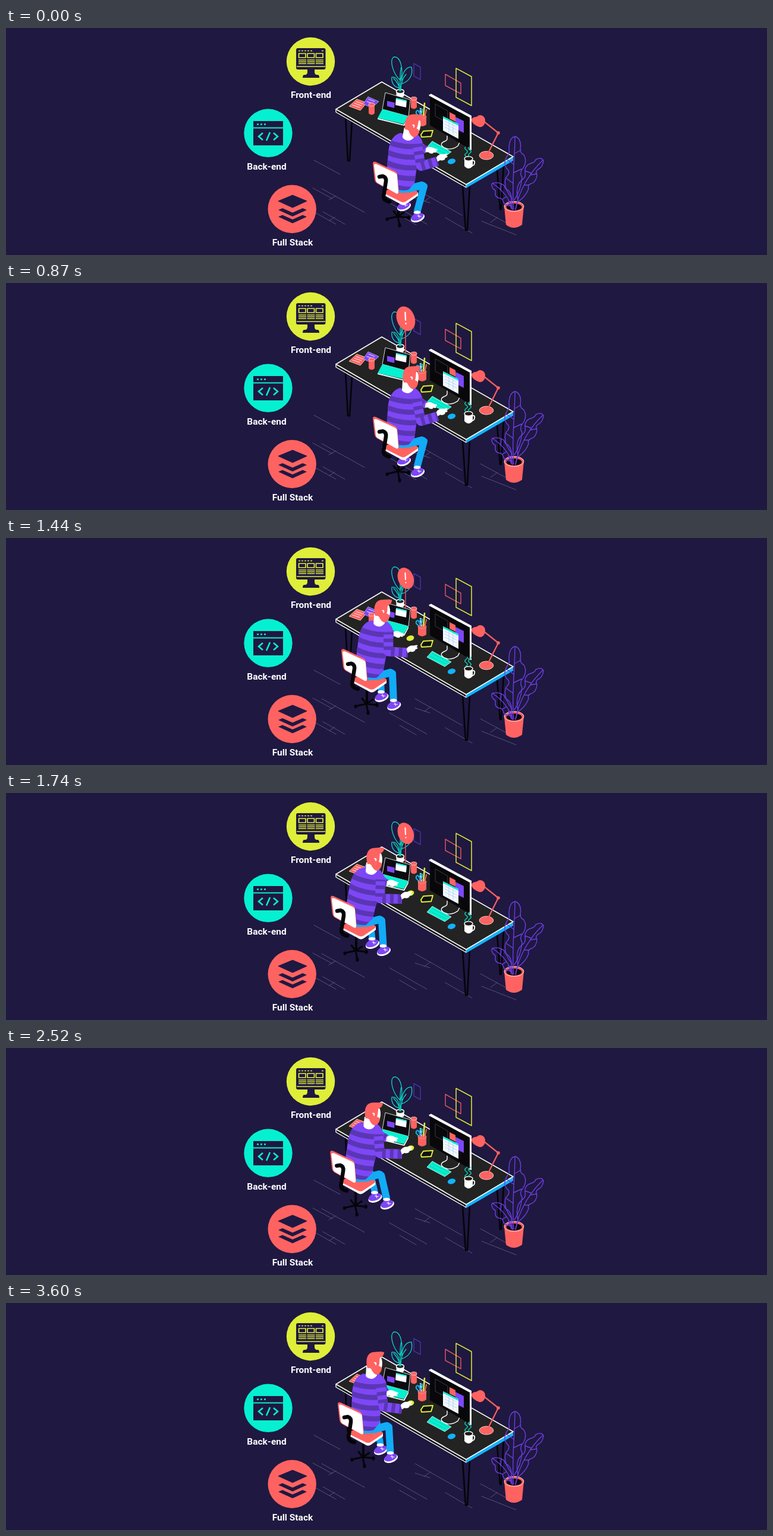
An HTML page that plays this animation: 1280x383 px, repeating every 3.63 s.

```html
<!DOCTYPE html>
<html lang="en">
<head>
<meta charset="utf-8">
<title>Developer at work</title>
<style>
  html, body { margin: 0; width: 100%; height: 100%; overflow: hidden; background: #1f1841; }
  svg { display: block; width: 100vw; height: 100vh; }
  .label { font: 700 15.5px Roboto, Arial, sans-serif; fill: #fff; text-anchor: middle; }
  .ink { fill: #1f1841; }
  .red { fill: #ff6361; }
  .teal { fill: #05f0d0; }
  .violet { fill: #7d47f5; }
  .blue { fill: #12b2fc; }
  .yellow { fill: #dfee39; }
  .white { fill: #fff; }
  .line { fill: none; stroke-linecap: round; stroke-linejoin: round; }
  .limb { fill: none; stroke: #12abf6; stroke-linejoin: round; }
  .sleeve { fill: none; stroke: #7d47f5; stroke-linejoin: round; }
  .band { fill: none; stroke: #5a36b4; }
  .iron { fill: none; stroke: #050409; stroke-linecap: round; stroke-linejoin: round; }
</style>
</head>
<body>
<svg viewBox="0 0 1280 383" preserveAspectRatio="none">
  <defs>
    <path id="trunk" d="M664 177C651 180 644 193 643 212C641 230 640 246 641 263Q656 277 677 273L687 262C690 246 690 232 697 217C706 201 702 185 688 177Q676 184 664 177Z"/>
    <clipPath id="trunkClip"><use href="#trunk"/></clipPath>
    <g id="shoe">
      <ellipse class="white" rx="12" ry="6.800" transform="rotate(-20) translate(0 1.500)"/>
      <ellipse class="violet" rx="11" ry="6" transform="rotate(-20) translate(0 -.5)"/>
      <path class="violet" d="M-6-8H5L6 0-6 2Z"/>
      <ellipse class="white" cx="-.5" cy="-8" rx="6" ry="2.800"/>
      <path class="line" stroke="#fff" d="M0-2 6-1M2-4 3 1"/>
    </g>
    <path id="hand" class="white" d="M-9-2C-5-6 0-6 4-4L10-3Q12-1 8 0L10 2Q8 4 5 3L4 5Q0 7-4 4L-9 5Z"/>
    <g id="can">
      <path class="red" d="M-5-8V7Q0 12 5 7V-8Z"/>
      <ellipse class="red" cy="-8" rx="5" ry="2.800" stroke="#ffd5cf" stroke-width=".8"/>
    </g>
  </defs>

  <!-- topic badges -->
  <circle class="yellow" cx="512.500" cy="56.500" r="40.700"/>
  <g class="ink">
    <rect x="488" y="34" width="49.500" height="36" rx="3"/>
    <path d="M507 70H519V74Q519 78 522 79H525Q527 80 527 84H499Q499 80 501 79H504Q507 78 507 74Z"/>
  </g>
  <g class="line" stroke="#dfee39" stroke-width="1.700" style="stroke-linecap:butt">
    <path stroke-dasharray="3 2" d="M492 38.500H516M531 38.500H534"/>
    <path d="M492.500 43H504V50H492.500ZM507 43H518.500V50H507ZM521.500 43H533V50H521.500Z"/>
    <path stroke-width="1.400" d="M492 54H505M492 57H505M492 60H505M506.500 54H519.500M506.500 57H519.500M506.500 60H519.500M521 54H534M521 57H534M521 60H534M489 65H537"/>
  </g>
  <text class="label" x="513" y="118">Front-end</text>

  <circle class="teal" cx="441" cy="177.300" r="40.700"/>
  <rect class="ink" x="416" y="157" width="50" height="41"/>
  <g class="line" stroke="#05f0d0" stroke-width="2.600" style="stroke-linecap:butt;stroke-linejoin:miter">
    <path stroke-width="2" d="M416 168.500H466"/>
    <path stroke-dasharray="3 3" d="M422 162.500H437"/>
    <path d="M432 177 425 183 432 189M450 177 457 183 450 189M444 176 438 190"/>
  </g>
  <text class="label" x="438.500" y="239">Back-end</text>

  <circle class="red" cx="481.200" cy="305.500" r="40.700"/>
  <g class="ink">
    <path d="M482 282 506 292 482 303 458 292Z" stroke="#1f1841" stroke-linejoin="round"/>
    <path id="tier" d="M458 307 465 304 482 311.500 499 304 506 307 482 318Z"/>
    <use href="#tier" y="11.500"/>
  </g>
  <text class="label" x="482" y="367">Full Stack</text>

  <!-- floor and wall -->
  <path class="line" stroke="#58527a" stroke-width="1" d="M518 223 562 247M516 270 549 288M531 271 603 311M555 283 543 290M521 312 555 331M533 310 570 331M553 319 544 325M645 295 708 331M662 316 690 332M688 271 767 316M688 287 713 295M714 285 703 293M739 320 784 346M798 305 842 329M800 326 858 349M826 320 815 328"/>
  <g class="line" stroke-width="1.500">
    <path stroke="#4b2fa0" d="M686 60 697 66V87L686 81Z"/>
    <path stroke="#d9545f" d="M739 78 765 93V111L739 97Z"/>
    <path stroke="#dfee39" d="M757 68 783 82V131L757 117Z"/>
  </g>

  <!-- desk -->
  <path class="iron" stroke-width="2.600" d="M571 150 575 224H578L582 156M768 265 773 341H776L780 265M826 238 831 306H833L837 230"/>
  <path fill="#111" stroke="#fff" stroke-width="1.400" stroke-linejoin="round" d="M555 137 774 264V269L555 142Z"/>
  <path class="blue" d="M774 264 853 217V224L774 270Z"/>
  <path fill="#232323" stroke="#fff" stroke-width="1.600" stroke-linejoin="round" d="M555 137 632 91 853 217 774 264Z"/>

  <!-- desk plant -->
  <path class="white" d="M656.500 107V115Q663 121 669.500 115V107Z"/>
  <ellipse cx="663" cy="107" rx="6.500" ry="3.500" fill="#222" stroke="#fff" stroke-width="1.500"/>
  <path class="line" stroke="#08d9c1" stroke-width="1.300" d="M663 106C663 84 662 74 665 66M663 88C650 76 645 54 652 49C663 46 670 70 663 90M664 106C664 90 668 84 673 78M666 94C664 76 674 65 682 66C685 80 678 90 666 94M662 106C662 96 657 90 652 85M661 101C651 99 648 90 649 83C657 82 662 91 661 101"/>
  <g id="alert">
    <path stroke="#d94f56" stroke-width="1.600" d="M672 84V118"/>
    <ellipse class="red" cx="672.300" cy="68" rx="13" ry="18.500" transform="rotate(-20 672.300 68)"/>
    <path class="line" stroke="#fff" stroke-width="2" d="M671.500 59 672 70M672.500 75V75.500"/>
  </g>

  <!-- papers, cans, laptop -->
  <path class="red" stroke="#ffd5cf" stroke-width=".8" d="M577 132 590 120 607 126 596 139Z"/>
  <path class="violet" stroke="#c6b2ff" stroke-width=".8" d="M601 128 609 116 627 124 615 135Z"/>
  <path class="line" stroke="#fff" stroke-width=".9" d="M589 124 600 128M586 127 598 131M583 130 595 134M610 120 620 124M607 124 618 128"/>
  <use href="#can" x="615" y="137"/>
  <path fill="#0c0b10" stroke="#d8d8e0" stroke-width="1" stroke-linejoin="round" d="M638 109 680 121 677 149 633 137Z"/>
  <path class="violet" d="M641 123 654 126 653 135 641 132Z"/>
  <path class="white" d="M656 118 674 122 673 134 655 130Z"/>
  <path class="teal" d="M656 118 674 122V124L656 120Z"/>
  <path class="white" d="M625 152 669 163 677 149V152L670 165 625 154Z"/>
  <path class="teal" d="M625 152 633 137 677 149 669 162Z"/>
  <use href="#can" x="686" y="127"/>

  <!-- pen pot, phone, mice -->
  <g class="line" stroke-width="2">
    <path stroke="#dfee39" stroke-width="2.600" d="M704 127 702 150"/>
    <path stroke="#ff6361" d="M707 138 704 150"/>
    <path stroke="#fff" d="M697 136 699 150"/>
    <path stroke="#12b2fc" d="M696 151 692 146C688 144 690 137 694 140L698 150M696 141C697 134 702 136 700 141L697 148"/>
  </g>
  <path class="red" d="M693 149V163Q700 169 707 163V149Z"/>
  <ellipse cx="700" cy="149.500" rx="7" ry="3" fill="none" stroke="#ff8b84"/>
  <path fill="#111" stroke="#dfee39" stroke-width="2" stroke-linejoin="round" d="M698 180 702 174 718 173 715 183 699 184Z"/>
  <ellipse class="yellow" cx="680" cy="169" rx="6.500" ry="4.500" transform="rotate(-15 680 169)"/>
  <ellipse class="blue" cx="749.500" cy="225" rx="6.800" ry="4.500" transform="rotate(-15 749.500 225)"/>

  <!-- monitor -->
  <path class="line" stroke="#fff" stroke-width="1.400" d="M742 182V187Q742 190 736 192C728 196 734 202 743 204Q752 205 760 199L763 193"/>
  <path class="white" d="M711 113 715 111 783 148V206L779 205Z"/>
  <path fill="#08080b" d="M713 115 780 151V204L713 164Z"/>
  <path fill="none" stroke="#3b3946" d="M722 128 743 140V160L722 149Z"/>
  <path class="red" d="M746 142 756 147V158L746 153Z"/>
  <path class="violet" d="M756 150 770 157V177L756 170Z"/>
  <path fill="#f0f8ff" d="M735 149 761 162V187L735 173Z"/>
  <path class="teal" d="M735 149 761 162V165L735 152Z"/>
  <path fill="none" stroke="#a8c3ec" stroke-width=".7" d="M738 157 758 167M738 162 758 172M738 167 758 177M745 157V176M752 160V180"/>

  <!-- keyboard, lamp, mug -->
  <path class="teal" stroke="#fff" stroke-width=".7" d="M708 201 717 191 749 209 738 217Z"/>
  <path fill="none" stroke="#05b9a3" stroke-dasharray="2 1" d="M713 199 741 213M717 195 745 210"/>
  <ellipse class="red" cx="808" cy="215" rx="11.800" ry="7" stroke="#ffd0c9"/>
  <path class="line" stroke="#f35f5f" stroke-width="2.300" d="M803 157 828 177 810 213"/>
  <circle class="red" cx="828" cy="177" r="2.800"/>
  <path class="red" d="M783 154C785 149 792 151 794 148C799 145 806 149 806 156C806 164 801 168 796 167C790 165 782 160 783 154Z"/>
  <path class="line" stroke="#fff" stroke-width="1.800" d="M785 224C790 222 789 232 784 232"/>
  <path class="white" d="M771 220V233Q778 241 785 233V220Z"/>
  <ellipse cx="778" cy="220.500" rx="7" ry="3.800" fill="#24160f" stroke="#fff" stroke-width="1.500"/>
  <path id="steam" class="line" stroke="#08cdb8" stroke-width="1.500"/>

  <!-- floor plant -->
  <path class="red" d="M838 301 841 332Q854 342 868 332L871 301Z"/>
  <ellipse cx="854.500" cy="301" rx="16.500" ry="8.500" fill="#ff6361" stroke="#ffd0c9"/>
  <ellipse cx="854.500" cy="302" rx="13" ry="6" fill="#0b0812"/>
  <g class="line" stroke="#6c3ee0" stroke-width="1.400">
    <path d="M854 306C850 270 856 220 856 184M851 288Q835 268 841 252Q848 246 845 240Q834 230 843 216Q848 211 846 205Q846 184 857 183Q868 188 865 205Q865 211 871 214Q878 226 867 240Q864 246 868 252Q866 274 855 290M855 212 866 206M854 230 843 222M854 244 867 238M853 262 842 254"/>
    <path d="M857 306C862 276 880 245 903 223M861 290Q856 266 868 256Q875 252 873 243Q872 231 884 228Q890 226 891 222Q901 217 904 224Q903 235 894 239Q890 242 893 249Q891 261 882 263Q877 265 879 271Q875 283 862 293M884 245 873 241M882 248 893 246M872 265 880 265"/>
    <path d="M852 306C847 288 835 273 818 262M849 300Q838 300 836 292Q835 287 829 287Q822 285 823 278Q824 273 820 272Q815 265 818 262Q830 259 838 266Q839 272 844 273Q852 280 850 296M832 274 833 263M841 285 835 289"/>
    <path d="M850 305 845 292M852 306 850 290M857 306 861 291"/>
  </g>

  <!-- person and chair -->
  <g id="base">
    <path class="iron" stroke-width="4" d="M660 294V317"/>
    <path class="iron" stroke-width="3" d="M659 318 641 322M659 318 662 333M659 318 677 320M659 318 652 309M659 318 670 311"/>
    <path class="iron" stroke-width="5" d="M641 322V323M662 332V334M677 319V321"/>
  </g>
  <path id="farLeg" class="limb" stroke-width="11"/>
  <use id="farShoe" href="#shoe"/>
  <g id="seat">
    <path class="white" d="M636 282 665 298Q669 300 673 297L693 283V277L636 276Z"/>
    <path class="red" d="M632 277 660 266 691 275Q695 278 690 281L672 293Q668 295 664 293Z"/>
  </g>
  <path id="thigh" class="limb" stroke-width="13"/>
  <path id="shin" class="limb" stroke-width="12"/>
  <use id="nearShoe" href="#shoe"/>
  <path id="farArm" class="sleeve" stroke-width="12"/>
  <path id="farBand" class="band" stroke-width="12" stroke-dasharray="5 7"/>
  <use id="farHand" href="#hand"/>
  <g id="torso">
    <use href="#trunk" class="violet"/>
    <path clip-path="url(#trunkClip)" class="band" stroke-width="8.500" d="M636 189Q668 206 710 197M636 207Q668 224 710 215M636 225Q668 242 710 233M636 243Q668 260 710 251M636 261Q668 278 710 269"/>
  </g>
  <path id="arm" class="sleeve" stroke-width="16"/>
  <path id="armBand" class="band" stroke-width="16" stroke-dasharray="6 7" stroke-dashoffset="3"/>
  <use id="nearHand" href="#hand"/>
  <g id="head">
    <path class="white" d="M-8-14H8L10 1Q6 7 0 7Q-7 6-9 2ZM5-30 17-29C20-22 19-14 17-9L5-6Z"/>
    <path class="red" d="M-6-11C-8-18-9-28-4-34C1-40 10-38 17-39L22-38C22-33 19-30 15-29C14-25 15-20 13-15C16-14 18-13 18-9C16-3 13 0 9 0C4-2 2-6 0-10Q-3-12-6-11Z"/>
    <path class="line" stroke="#fff" stroke-width="2" d="M6-20Q9-21 8-17"/>
  </g>
  <g id="back">
    <path class="red" d="M617 229Q617 224 622 226L654 241Q658 243 658 247L661 277Q661 282 656 280L624 262Q621 260 620 256Z"/>
    <path class="white" d="M619 232Q619 228 624 230L654 244Q658 246 658 250L660 276Q660 281 656 279L626 262Q622 260 622 256Z"/>
    <path class="iron" stroke-width="6.500" d="M628 251 634 250Q640 252 639 259L635 284Q635 291 645 293"/>
  </g>
</svg>

<script>
const LOOP = 3630;
const el = id => document.getElementById(id);
const set = (id, name, value) => el(id).setAttribute(name, value);

// Rows are [time, ...values]; eased between neighbours.
function track(t, rows) {
  if (t <= rows[0][0]) return rows[0].slice(1);
  const i = rows.findIndex(r => r[0] > t);
  if (i < 0) return rows[rows.length - 1].slice(1);
  const a = rows[i - 1], b = rows[i];
  let u = (t - a[0]) / (b[0] - a[0]);
  u = u * u * (3 - 2 * u);
  return a.slice(1).map((v, k) => v + (b[k + 1] - v) * u);
}

const chair = [[1000, 0, 0], [1200, -7, -4.5], [1580, -73, -53], [1740, -71, -52],
  [2160, -73, -52.5], [2780, -71, -52], [3220, -59, -58]];
const lean = [[0, 0], [510, -1], [960, -1], [1200, -7], [1580, 9], [2160, 9], [2820, 4], [3220, -3]];
const nod = [[0, 4, 7], [330, -2, -2], [510, 0, 0], [1000, 0, 0], [1200, -3, 0], [1580, 4, 0],
  [2160, 4, 0], [2820, 3, 4], [3260, 0, -1], [3440, 1, 1], [3600, 0, 0]];
const nearFoot = [[1200, 692, 319], [1580, 635, 266], [2300, 635, 266], [2750, 647, 261]];
const farFoot = [[1000, 669, 300], [1200, 667, 299], [1580, 616, 254], [2350, 616, 254], [2800, 630, 247.5]];
const nearHand = [[900, 733, 218], [1200, 711, 229], [1560, 673, 172]];
const farHand = [[850, 715, 206], [1200, 687, 190], [1560, 649, 153]];
const elbow = [[950, 698, 233], [1200, 685, 231], [1560, 629, 178], [2800, 629, 178], [3220, 635, 175]];
const pop = [[640, 0], [820, 1.25], [960, .94], [1060, 1]];
const fade = [[2040, 1], [2220, 0]];

function steam(t) {
  let d = "";
  for (const x of [774, 780]) {
    for (let y = 201; y <= 217; y++) {
      const sway = 2.2 * Math.sin(y * .55 + t / LOOP * Math.PI * 8);
      d += (y > 201 ? "L" : "M") + (x + sway).toFixed(2) + " " + y;
    }
  }
  return d;
}

function draw(t) {
  const [cx, cy] = track(t, chair);
  const [l] = track(t, lean);
  const [dy, tilt] = track(t, nod);
  const at = (x, y) => [x + cx, y + cy];
  const move = (id, x, y, rest = "") => set(id, "transform", `translate(${x} ${y}) ${rest}`);
  const path = (id, ...pts) => set(id, "d", "M" + pts.map(p => p.join(" ")).join("L"));

  for (const id of ["base", "seat", "back"]) move(id, cx, cy);
  move("torso", cx, cy, `rotate(${l * .65} 662 268)`);
  move("head", 676 + cx + l, 179 + cy + dy, `rotate(${tilt})`);

  const [nx, ny] = track(t, nearFoot), [fx, fy] = track(t, farFoot);
  const knee = at(703, 267);
  path("thigh", at(654, 272), at(678, 271), at(699, 265.5), knee);
  path("shin", at(697, 264), knee, [nx - .5, ny - 9]);
  path("farLeg", at(672, 266), at(682, 253), [fx, fy - 8]);
  move("nearShoe", nx, ny);
  move("farShoe", fx, fy);

  const tap = t < 900 || t > 1650 ? Math.sin(t / 38) : 0;
  const [hx, hy] = track(t, nearHand), [gx, gy] = track(t, farHand);
  const joint = track(t, elbow);
  const press = t < 900 ? tap : 0;
  for (const id of ["arm", "armBand"])
    path(id, at(692 + l, 198), joint, [hx - 7, hy + 7]);
  for (const id of ["farArm", "farBand"])
    path(id, at(690 + l, 194), [gx - 7, gy + 1]);
  move("nearHand", hx, hy + press, "rotate(-18)");
  move("farHand", gx + tap * .5, gy - tap, "rotate(8)");

  const [s] = track(t, pop);
  move("alert", 672, 118, `scale(${s}) translate(-672 -118)`);
  set("alert", "opacity", track(t, fade)[0]);
  set("steam", "d", steam(t));
}

const start = performance.now();
function tick() {
  draw((performance.now() - start) % LOOP);
  requestAnimationFrame(tick);
}
tick();
</script>
</body>
</html>
```
